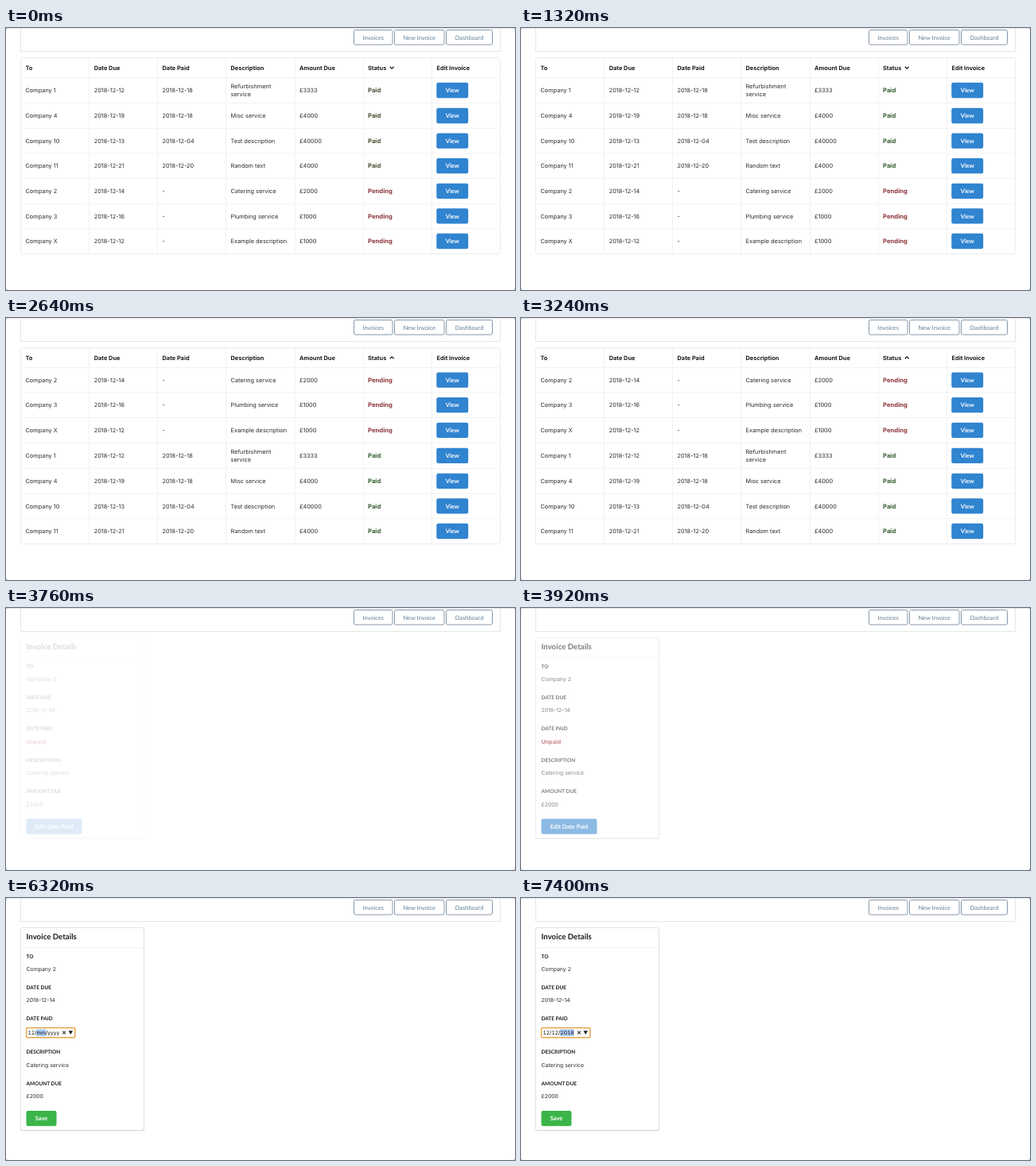
These frames come from a looping animation (640x330 px, 8 s). An HTML page:

```html
<!DOCTYPE html>
<html lang="en">
<head>
<meta charset="utf-8">
<title>Invoices</title>
<style>
  html, body { margin: 0; width: 100%; height: 100%; overflow: hidden; background: #fff; }
  svg { display: block; width: 100%; height: 100%; text-rendering: geometricPrecision; }
  text { font: 7.35px Inter, "Noto Sans", sans-serif; fill: #2b2c2d; }
  .head { font-size: 7.4px; font-weight: 700; fill: #1b1c1d; }
  .status { font-size: 7.7px; font-weight: 700; }
  .nav { font: 7.5px Lato, sans-serif; fill: #5f8099; text-anchor: middle; }
  .button { font: 700 7.5px Lato, sans-serif; fill: #fff; text-anchor: middle; }
  .title { font: 700 9.7px Lato, sans-serif; fill: #1b1c1d; }
  .label { font: 700 6.5px Lato, sans-serif; fill: #1b1c1d; }
  .value { font-size: 6.9px; }
  .unpaid { font-size: 7.1px; font-weight: 700; fill: #a3282e; }
  .date { font-size: 6.6px; font-variant-numeric: tabular-nums; fill: #111; }
</style>
</head>
<body>
<svg id="stage" viewBox="0 0 640 330"></svg>
<script>
const LOOP = 8000, SORT = 2000, OPEN = 3700, OPENED = 4100, EDIT = 4760;
const LINE = '#f2f2f3', BLUE = '#3084d0', GREEN = '#3bb54a', RED = '#8c363a';
const stage = document.getElementById('stage');

function add(parent, name, attrs = {}, content) {
  const node = document.createElementNS('http://www.w3.org/2000/svg', name);
  setAll(node, attrs);
  if (content !== undefined) node.textContent = content;
  return parent.appendChild(node);
}
function setAll(node, attrs) {
  for (const key in attrs) node.setAttribute(key, attrs[key]);
}
const group = parent => add(parent, 'g');
const show = (node, on) => node.setAttribute('visibility', on ? 'inherit' : 'hidden');
const label = (parent, x, y, content, style = '') =>
  add(parent, 'text', { x, y, class: style }, content);
const line = (parent, d, stroke = LINE, width = 1) =>
  add(parent, 'path', { d, stroke, 'stroke-width': width, fill: 'none' });
const box = (parent, x, y, width, height, attrs) =>
  add(parent, 'rect', { x, y, width, height, ...attrs });

function button(parent, x, y, width, content, fill) {
  box(parent, x, y, width, 19.3, { rx: 2.2, fill });
  label(parent, x + width / 2, y + 12.3, content, 'button');
}

// Window and navigation
box(stage, 0, 0, 640, 330, { fill: '#777' });
box(stage, 0, 0, 640, 330, { fill: '#fff', rx: 2 });
line(stage, 'M2 0H638', '#d0d0d0');
line(stage, 'M18.5 0V29.5H621.5V0', '#e4e5e6');
[['Invoices', 437.5, 48.5], ['New Invoice', 488.5, 62.5], ['Dashboard', 553.5, 58]].forEach(([name, x, width]) => {
  box(stage, x, 2.5, width, 18.5, { rx: 2, fill: '#fff', stroke: '#8698ab' });
  label(stage, x + width / 2, 14.6, name, 'nav');
});

// Invoice table
const TOP = 62.3, columns = [24.5, 110.7, 196.5, 282.5, 369, 455, 541.5];
const table = group(stage);
box(table, 18.5, 37.5, 603, 247, { rx: 2, fill: 'none', stroke: '#ececed' });
line(table, 'M19 62.5H621');
columns.slice(1).forEach(x => line(table, `M${Math.round(x - 6.5) + .5} 38V284`));
['To', 'Date Due', 'Date Paid', 'Description', 'Amount Due', 'Status', 'Edit Invoice']
  .forEach((name, i) => label(table, columns[i], 52.8, name, 'head'));
const chevron = line(table, '', '#1b1c1d', 1.3);

const invoices = [
  ['Company 1', '12', '18', 'Refurbishment service', 3333],
  ['Company 4', '19', '18', 'Misc service', 4000],
  ['Company 10', '13', '04', 'Test description', 40000],
  ['Company 11', '21', '20', 'Random text', 4000],
  ['Company 2', '14', '', 'Catering service', 2000],
  ['Company 3', '16', '', 'Plumbing service', 1000],
  ['Company X', '12', '', 'Example description', 1000]
];
const rows = invoices.map(([to, due, paid, description, amount]) => {
  const node = group(table);
  const lines = description.startsWith('Refurb') ? description.split(' ') : [description];
  const height = lines.length > 1 ? 32.4 : 31.6;
  label(node, columns[0], 2.6, to);
  label(node, columns[1], 2.6, '2018-12-' + due);
  label(node, columns[2], 2.6, paid ? '2018-12-' + paid : '-');
  lines.forEach((part, i) => label(node, columns[3], 2.6 + (i - (lines.length - 1) / 2) * 10.2, part));
  label(node, columns[4], 2.6, '£' + amount);
  const status = label(node, columns[5], 2.6, paid ? 'Paid' : 'Pending', 'status');
  status.style.fill = RED;
  button(node, 541.3, -9.65, 39.9, 'View', BLUE);
  const rule = line(node, `M19 ${height / 2}H621`);
  return { node, status, rule, height, paid };
});
const pendingFirst = [...rows.slice(4), ...rows.slice(0, 4)];

function drawTable(t) {
  const sorted = t >= SORT;
  let y = TOP;
  (sorted ? pendingFirst : rows).forEach((row, i) => {
    row.node.setAttribute('transform', `translate(0 ${y + row.height / 2})`);
    show(row.rule, i < 6);
    y += row.height;
  });
  const k = Math.min(1, Math.max(0, (t - 40) / 800));
  const mix = (a, b) => Math.round(a + (b - a) * k);
  rows.filter(row => row.paid).forEach(row => {
    row.status.style.fill = `rgb(${mix(74, 50)},${mix(78, 94)},${mix(52, 46)})`;
  });
  chevron.setAttribute('d', sorted ? 'M482.8 51.2L485.2 48.8L487.6 51.2' : 'M482.8 48.8L485.2 51.2L487.6 48.8');
}

// Invoice card
const card = group(stage);
const shadow = box(card, 18, 38, 156, 255, { rx: 2.5, fill: '#d6d6d8' });
const panel = box(card, 18.3, 37.3, 155.2, 255, { rx: 2.5, fill: '#fff', stroke: '#dededf', 'stroke-width': .8 });
line(card, 'M19 62.5H173');
label(card, 25.5, 52.2, 'Invoice Details', 'title');
const lower = group(card);
[['TO', 'Company 2'], ['DATE DUE', '2018-12-14'], ['DATE PAID', ''],
 ['DESCRIPTION', 'Catering service'], ['AMOUNT DUE', '£2000']].forEach(([name, value], i) => {
  const parent = i > 2 ? lower : card, y = 75.5 + i * 39.4;
  label(parent, 25.5, y, name, 'label');
  label(parent, 25.5, y + 16.4, value, 'value');
});
const viewing = group(card), editing = group(card);
label(viewing, 25.5, 171, 'Unpaid', 'unpaid');
button(viewing, 25.5, 265.5, 70, 'Edit Date Paid', BLUE);
button(editing, 25.5, 268, 38, 'Save', GREEN);

// Date field
const ring = box(editing, 25.6, 163.4, 61.2, 12.4, { rx: 1, fill: '#fff', stroke: '#e6a54a', 'stroke-width': 1.5 });
const highlight = box(editing, 0, 165.3, 0, 8.8, { fill: '#abcdf8' });
const date = label(editing, 27.5, 172, '', 'date');
const clear = line(editing, 'M71.2 167.6L75 171.4M75 167.6L71.2 171.4', '#333', 1.1);
const arrow = add(editing, 'path', { d: 'M78.5 167.3H84L81.25 171.9Z', fill: '#222' });

// Time, text, selected part
const typing = [
  [0, 'dd/mm/yyyy', -1],
  [5600, 'dd/mm/yyyy', 0],
  [6200, '01/mm/yyyy', 0],
  [6320, '12/mm/yyyy', 1],
  [6600, '12/01/yyyy', 1],
  [6680, '12/12/yyyy', 2],
  [7280, '12/12/0201', 2],
  [7400, '12/12/2018', 2]
];

function drawDate(t) {
  const [, content, part] = typing.filter(step => step[0] <= t).pop();
  const focused = part >= 0;
  date.textContent = content;
  [ring, highlight, arrow].forEach(node => show(node, focused));
  show(clear, /\d/.test(content));
  if (!focused) return;
  const first = part * 3, last = part === 2 ? 9 : first + 1;
  const x = date.getStartPositionOfChar(first).x;
  setAll(highlight, { x: x - .3, width: date.getEndPositionOfChar(last).x - x + .6 });
}

function drawCard(t) {
  const edit = t >= EDIT;
  card.setAttribute('opacity', Math.min(1, Math.max(0, (t - OPEN) / (OPENED - OPEN))));
  panel.setAttribute('height', edit ? 255.2 : 252.7);
  shadow.setAttribute('height', edit ? 255.5 : 253);
  lower.setAttribute('transform', `translate(0 ${edit ? 2.5 : 0})`);
  viewing.setAttribute('display', edit ? 'none' : 'inline');
  editing.setAttribute('display', edit ? 'inline' : 'none');
  if (edit) drawDate(t);
}

function render() {
  const t = performance.now() % LOOP, open = t >= OPEN;
  table.setAttribute('display', open ? 'none' : 'inline');
  card.setAttribute('display', open ? 'inline' : 'none');
  open ? drawCard(t) : drawTable(t);
  requestAnimationFrame(render);
}
render();
</script>
</body>
</html>
```
